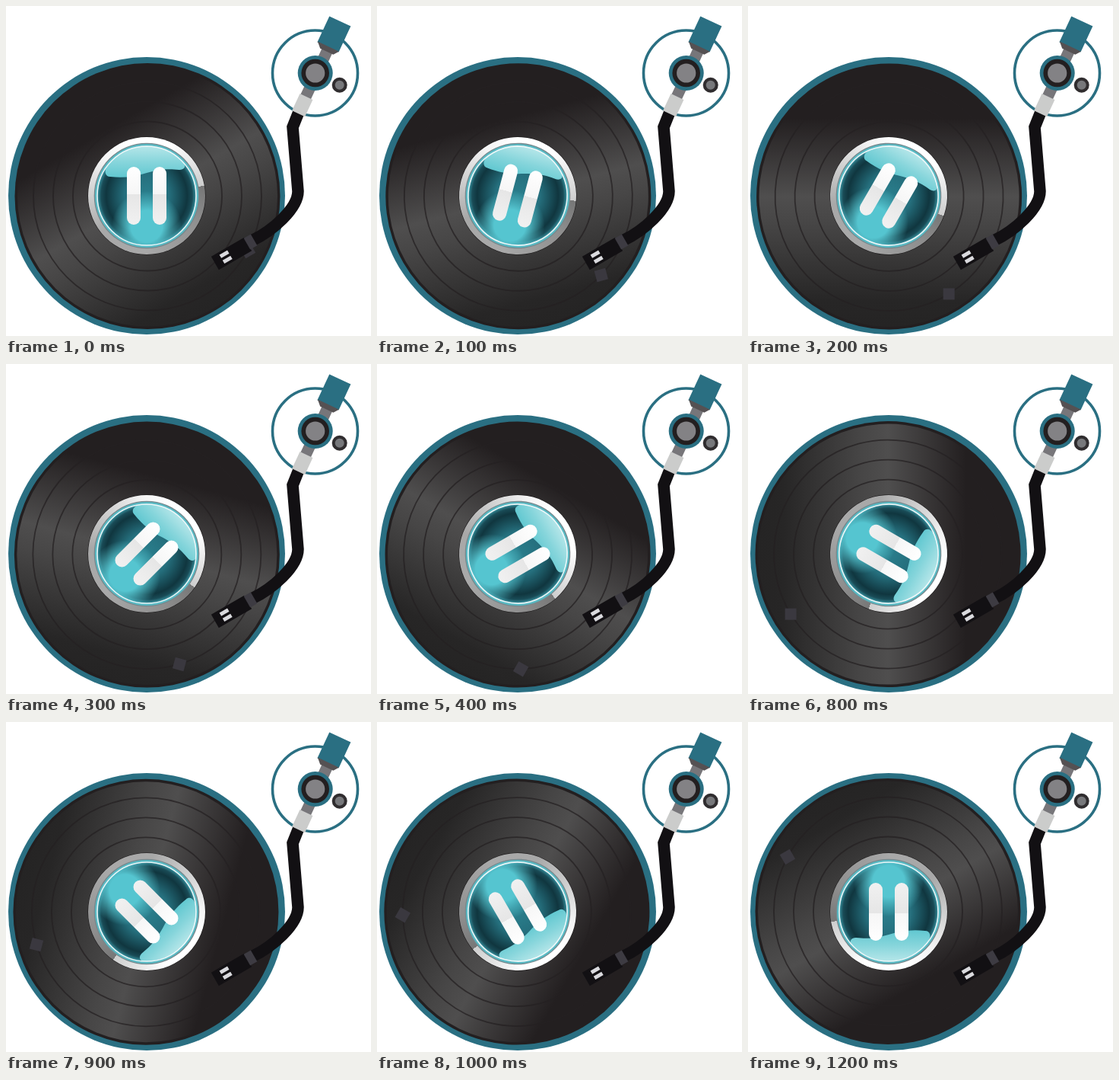
Animation, 480 px wide and 433 px high, one loop 1300 ms. Source, as an HTML page with a canvas:

```html
<!DOCTYPE html>
<html lang="en">
<head>
<meta charset="utf-8">
<title>Turntable</title>
<style>
  html, body { margin: 0; width: 100%; height: 100%; overflow: hidden; background: #fff; }
  canvas { display: block; width: 480px; height: 433px; }
</style>
</head>
<body>
<canvas id="stage"></canvas>
<script>
const W = 480, H = 433;
const LOOP = 1300, STEP = 100, TURN = 15;
const TEAL = '#2a6f82', DARK = '#231f20', BLACK = '#121013';
const rad = deg => deg * Math.PI / 180;

const canvas = document.getElementById('stage');
const ctx = canvas.getContext('2d');
const dpr = window.devicePixelRatio || 1;
canvas.width = W * dpr;
canvas.height = H * dpr;

function disc(x, y, r, fill) {
  ctx.beginPath();
  ctx.arc(x, y, r, 0, Math.PI * 2);
  ctx.fillStyle = fill;
  ctx.fill();
}

function ring(x, y, r, width, color) {
  ctx.beginPath();
  ctx.arc(x, y, r, 0, Math.PI * 2);
  ctx.lineWidth = width;
  ctx.strokeStyle = color;
  ctx.stroke();
}

function poly(points, fill) {
  ctx.beginPath();
  points.forEach(([x, y]) => ctx.lineTo(x, y));
  ctx.closePath();
  ctx.fillStyle = fill;
  ctx.fill();
}

function box(x, y, w, h, fill) {
  ctx.fillStyle = fill;
  ctx.fillRect(x, y, w, h);
}

// Runs draw() in a coordinate system moved to (x, y) and rotated.
function at(x, y, deg, draw) {
  ctx.save();
  ctx.translate(x, y);
  ctx.rotate(rad(deg));
  draw();
  ctx.restore();
}

function shade(gradient, stops) {
  stops.forEach(([pos, color]) => gradient.addColorStop(pos, color));
  return gradient;
}

function drawRecord() {
  const ax = Math.sin(rad(30)), ay = Math.cos(rad(30));
  const sheen = shade(
    ctx.createLinearGradient(-171 * ax, -171 * ay, 171 * ax, 171 * ay),
    [[0, DARK], [0.2, DARK], [0.5, '#4f4e4e'], [0.6, '#474646'], [0.9, '#272626'], [1, '#252424']]
  );
  at(1, 0.5, 0, () => {
    disc(0, 0, 174.5, DARK);
    disc(0, 0, 171, sheen);
    [150, 124, 98].forEach(r => ring(0, 0, r, 1.8, 'rgba(36,33,34,0.75)'));
  });
  at(133, 72, -30, () => box(-7.5, -7.5, 15, 15, '#3a383f'));
}

function drawGloss() {
  ctx.beginPath();
  ctx.moveTo(-48, -25);
  ctx.bezierCurveTo(-54, -25, -56, -31, -53, -37);
  ctx.bezierCurveTo(-42, -56, -22, -65, 0, -65);
  ctx.bezierCurveTo(22, -65, 39, -58, 49, -43);
  ctx.bezierCurveTo(52, -38, 49, -34, 43, -34);
  ctx.bezierCurveTo(25, -36, 15, -34, 0, -30);
  ctx.bezierCurveTo(-16, -25, -30, -23, -48, -25);
  ctx.fillStyle = shade(ctx.createLinearGradient(0, -65, 0, -23),
    [[0, '#b5e6e9'], [0.5, '#86d5db'], [1, '#5fc7d0']]);
  ctx.fill();
}

function drawButton() {
  const metal = shade(ctx.createConicGradient(rad(-10), 0, 0),
    [[0, '#777'], [0.1, '#8f8f8f'], [0.28, '#a9a9a9'], [0.42, '#a8a8a8'],
     [0.53, '#cfcfcf'], [0.64, '#f4f4f4'], [0.72, '#fff'], [0.85, '#fff'], [1, '#cecece']]);
  disc(0, 0, 77.6, '#1c1a1b');
  disc(0, 0, 77, metal);
  disc(0, 0, 69.3, '#75878c');
  disc(0, 0, 68, '#58bac4');

  const base = shade(ctx.createRadialGradient(0, 0, 0, 0, 0, 65),
    [[0, '#2a7f8d'], [0.45, '#256f7d'], [0.82, '#10363f'], [0.92, '#194b56'], [1, '#3792a0']]);
  const glow = shade(ctx.createRadialGradient(0, 40, 0, 0, 40, 46),
    [[0, '#55c5d0'], [0.45, '#55c5d0'], [1, 'rgba(85,197,208,0)']]);
  disc(0, 0, 65, base);
  ctx.save();
  ctx.beginPath();
  ctx.arc(0, 0, 65, 0, Math.PI * 2);
  ctx.clip();
  disc(0, 40, 46, glow);
  drawGloss();
  ctx.restore();
  ring(0, 0, 65, 1.6, 'rgba(255,255,255,0.88)');

  const bar = shade(ctx.createLinearGradient(0, -38, 0, 38),
    [[0, '#fff'], [0.47, '#f6f6f6'], [0.47, '#e6e6e6'], [1, '#f1f1f1']]);
  [-17, 17].forEach(x => {
    ctx.beginPath();
    ctx.roundRect(x - 9, -38, 18, 76, 9);
    ctx.fillStyle = bar;
    ctx.fill();
  });
}

function drawArm() {
  ring(406.5, 88, 56, 3.6, TEAL);
  disc(438.7, 103.8, 10, '#302d2f');
  disc(438.7, 103.8, 6, '#77787b');

  ctx.beginPath();
  ctx.moveTo(385, 139);
  ctx.lineTo(377, 159);
  ctx.lineTo(384, 243);
  ctx.bezierCurveTo(384, 266, 350, 295, 324, 307.5);
  ctx.lineWidth = 15.5;
  ctx.lineJoin = 'miter';
  ctx.strokeStyle = BLACK;
  ctx.stroke();

  at(406.5, 88, 25, () => {
    box(-5.5, -36, 15, 70, '#77767a');
    box(-6.7, 33, 18.7, 24.5, '#cbcccb');
    box(-14.5, -75.5, 31, 37.5, TEAL);
    poly([[-14.5, -39], [16.5, -39], [11.5, -32], [-7.5, -32]], '#555153');
  });
  disc(406.7, 88, 23, TEAL);
  disc(406.7, 88, 18.3, DARK);
  disc(406.7, 88, 12.6, '#838285');

  at(296.5, 325, -30, () => {
    box(-25, -10, 50, 20, BLACK);
    box(-14.5, -6.6, 12, 5, '#dadade');
    box(-14.5, 1.7, 12, 5, '#dadade');
  });
  at(321.5, 309.5, -30, () => box(-5.3, -8.5, 10.6, 17, '#3d3b42'));
}

function frame() {
  const angle = Math.floor(performance.now() % LOOP / STEP) * TURN;
  ctx.setTransform(dpr, 0, 0, dpr, 0, 0);
  box(0, 0, W, H, '#fff');
  disc(185, 249, 182, TEAL);
  at(185, 249, angle, () => {
    drawRecord();
    drawButton();
  });
  drawArm();
  requestAnimationFrame(frame);
}
frame();
</script>
</body>
</html>
```
